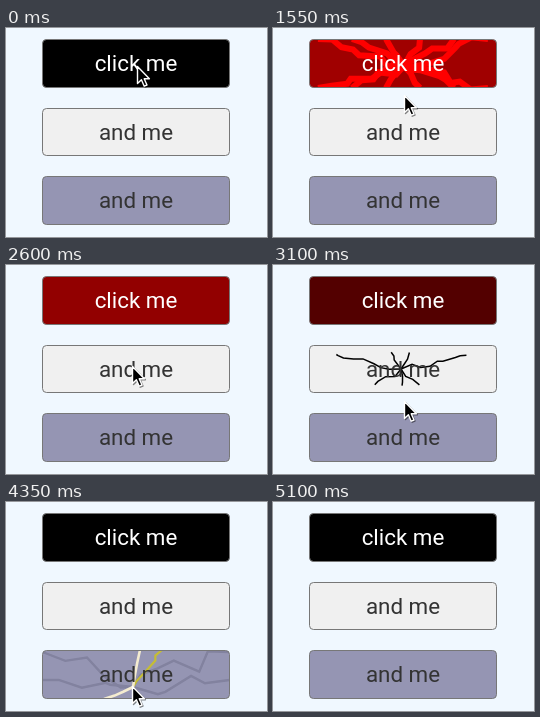
An HTML page that plays this animation: 261 by 209 pixels, repeating every 6.7 s.

```html
<!DOCTYPE html>
<html lang="en">
<head>
<meta charset="utf-8">
<title>Cracking buttons</title>
<style>
  html, body { margin: 0; width: 100%; height: 100%; overflow: hidden; background: aliceblue; }
  svg { display: block; }
  text { font: 22.4px Roboto, Arial, sans-serif; text-anchor: middle; }
  .crack path { fill: none; stroke-linejoin: miter; }
  .frame { fill: none; stroke: #777; }
  #cursor { stroke: #fff; stroke-width: 1.4; stroke-linejoin: round; filter: drop-shadow(1px 1px .7px #0007); }
</style>
</head>
<body>
<svg width="261" height="209" viewBox="0 0 261 209">
  <g id="buttons"></g>
  <path id="cursor" d="M.5 .5V17.5L4.4 13.8L7.2 20.2L10 19L7.2 12.8H12.4Z"/>
</svg>
<script>
const LOOP = 6700, STEP = 50;
const LEFT = 36.5, WIDTH = 187, RIGHT = LEFT + WIDTH;
const NS = 'http://www.w3.org/2000/svg';
const byId = id => document.getElementById(id);
const ramp = (t, from, to) => Math.max(0, Math.min(1, (t - from) / (to - from)));

let seed = 7;
const random = () => (seed = seed * 16807 % 2147483647) / 2147483647;
const jitter = size => (random() - .5) * size;

function add(parent, tag, attrs) {
  const el = document.createElementNS(NS, tag);
  for (const k in attrs) el.setAttribute(k, attrs[k]);
  return parent.appendChild(el);
}

function button(y, h, cx, cy, label, fill, ink) {
  const root = byId('buttons');
  const box = { x: LEFT, y: y + .5, width: WIDTH, height: h - 1, rx: 4 };
  const clip = add(root, 'clipPath', { id: 'clip' + y });
  add(clip, 'rect', box);
  const face = add(root, 'rect', { ...box, fill });
  const crack = add(root, 'g', { class: 'crack', 'clip-path': `url(#clip${y})` });
  add(root, 'rect', { ...box, class: 'frame' });
  add(root, 'text', { x: 130, y: y + 32, fill: ink }).textContent = label;
  return { face, crack, cx, cy, top: y, bottom: y + h };
}

// A jagged line from the click point to an end point on the edge
function arm(b, x, y, { stroke, width, segment, rough }) {
  const dx = x - b.cx, dy = y - b.cy;
  const n = Math.max(3, Math.round(Math.hypot(dx, dy) / segment));
  let d = `M${b.cx} ${b.cy}`;
  for (let i = 1; i <= n; i++) {
    const size = i < n ? rough : 0;
    d += `L${b.cx + dx * i / n + jitter(size)} ${b.cy + dy * i / n + jitter(size)}`;
  }
  add(b.crack, 'path', { d, stroke, 'stroke-width': width, pathLength: 1 });
}

const first = button(11, 49, 131, 38, 'click me', '#000', '#fff');
const second = button(80, 48, 128, 104, 'and me', '#f0f0f0', '#333');
const third = button(148, 49, 127, 185, 'and me', '#9595b3', '#333');

const lava = { stroke: '#f00', width: 6, segment: 12, rough: 11 };
for (let i = 0; i < 6; i++) {
  const x = LEFT + WIDTH * (i + .25) / 5.5;
  arm(first, x, first.top, lava);
  arm(first, x, first.bottom, lava);
}

const ink = { stroke: '#000', width: 1.5, segment: 9, rough: 6 };
arm(second, LEFT, second.top + 3, ink);
arm(second, RIGHT, second.top + 4, ink);
for (const x of [113, 140]) arm(second, x, second.top, ink);
for (const x of [90, 128, 154]) arm(second, x, second.bottom, ink);

const vein = { stroke: '#82829f', width: 2.4, segment: 18, rough: 18 };
for (const y of [150, 178]) {
  arm(third, LEFT, y, vein);
  arm(third, RIGHT, y, vein);
}
arm(third, 156, third.top, { stroke: '#c5bd35', width: 2.2, segment: 10, rough: 10 });
const flash = { stroke: '#f4ecd0', width: 2.6, segment: 20, rough: 2 };
arm(third, 134, third.top, flash);
arm(third, 98, third.bottom, flash);

function setCrack(b, grow, opacity) {
  b.crack.style.display = grow > 0 && opacity > 0 ? '' : 'none';
  b.crack.style.opacity = opacity;
  for (const path of b.crack.children) path.setAttribute('stroke-dasharray', `${grow} 2`);
}

function draw(t) {
  const red = Math.max(0, Math.min(.291 * (t - 1000), .127 * (3750 - t)));
  first.face.setAttribute('fill', `rgb(${Math.round(red)},0,0)`);
  setCrack(first, t < 1000 ? 0 : .2 + .8 * ramp(t, 1000, 1450), 1 - ramp(t, 1600, 1850));
  setCrack(second, ramp(t, 2650, 3300), 1 - ramp(t, 3750, 4100));
  setCrack(third, t < 4250 ? 0 : .4 + .6 * ramp(t, 4250, 4350), 1 - ramp(t, 4350, 4800));

  const x = 131 - 5 * ramp(t, 1700, 1950) + 5 * ramp(t, 2700, 2900) - 5 * ramp(t, 3800, 4000);
  const y = 38 + 63 * ramp(t, 1200, 1950) + 83 * ramp(t, 2700, 3640);
  byId('cursor').setAttribute('transform', `translate(${Math.round(x)} ${Math.round(y)})`);
  byId('cursor').style.display = t < 5100 ? '' : 'none';
}

const start = performance.now();
function tick() {
  const t = (performance.now() - start) % LOOP;
  draw(Math.floor(t / STEP) * STEP);
  requestAnimationFrame(tick);
}
tick();
</script>
</body>
</html>
```
